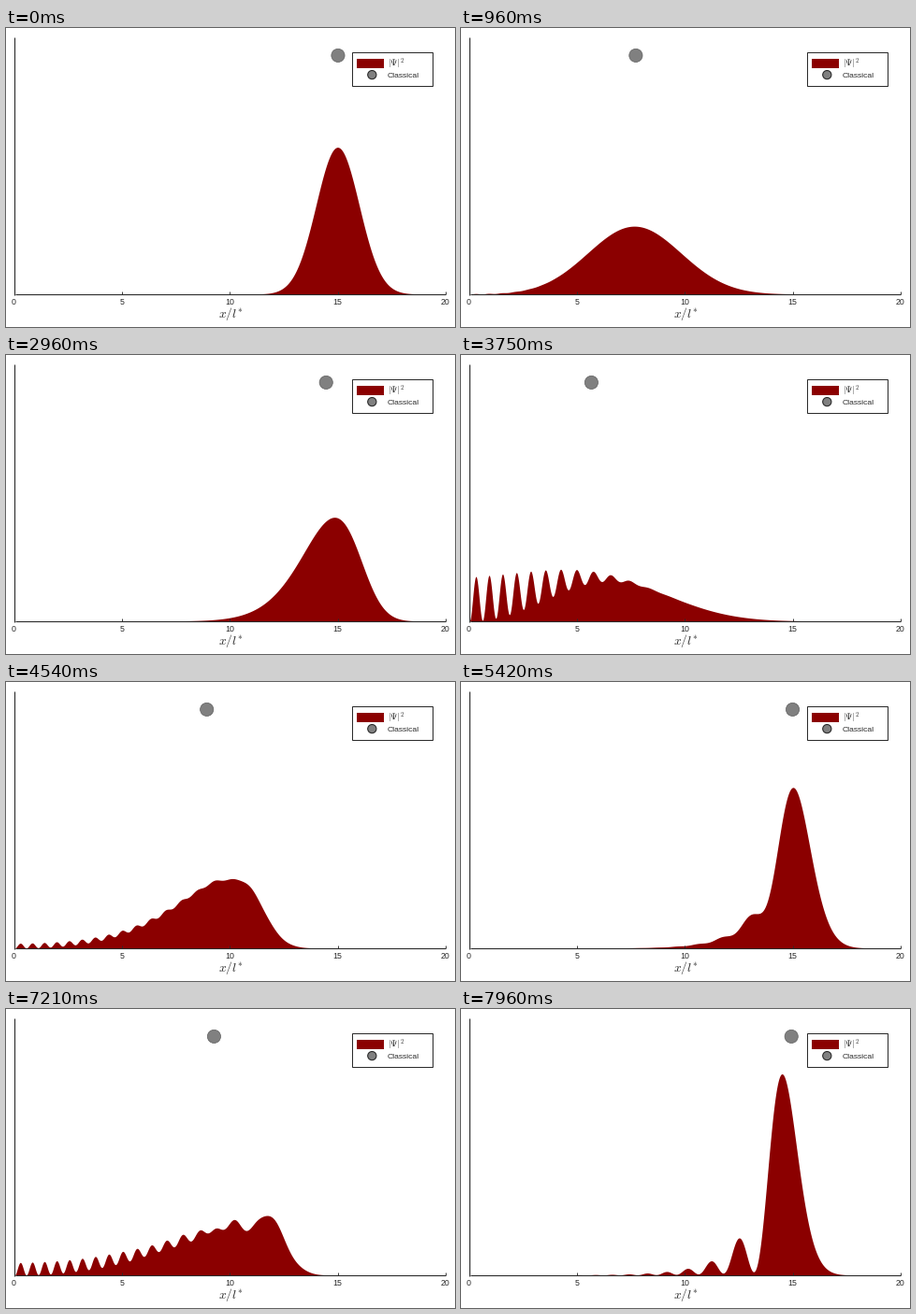
A matplotlib script that plays this animation: 480 by 320 pixels, repeating every 8000 ms.

```python
import numpy as np
import matplotlib.pyplot as plt
from matplotlib.animation import FuncAnimation
from matplotlib.patches import Circle, Polygon, Rectangle

W, H, DPI = 480, 320, 100
PX = 72 / DPI                      # points per pixel
FRAMES, LOOP = 192, 8000
X0, Y0 = 9.5, 285.3                # pixel position of the plot's corner
SX, SY = 23.03, 394.0              # pixels per unit of x and of density
START = 15.0                       # release height
DT = 0.02491 * np.sqrt(2 * START)  # time of one simulation step
WAVE_RATE = 1.0035                 # the wave runs slightly ahead of the ball
RED = "#8b0000"
GRAY = "#808080"
INK = "#2a2a2a"

plt.rcParams["font.family"] = "Liberation Sans"
plt.rcParams["mathtext.fontset"] = "cm"

# Bouncing wave packet: H = p^2/2 + x with a hard wall at x = 0,
# diagonalised in a sine basis on a box of length BOX.
BOX, N = 32.0, 340
n = np.arange(1, N)
grid = n * BOX / N
sines = np.sqrt(2 / N) * np.sin(np.pi * np.outer(n, n) / N)
kinetic = (np.pi * n / BOX) ** 2 / 2
energy, states = np.linalg.eigh((sines * kinetic) @ sines + np.diag(grid))

packet = np.exp(-(grid - START) ** 2 / 4) / (2 * np.pi) ** 0.25
amps = states.T @ packet
keep = np.abs(amps) > 1e-7
energy, amps = energy[keep], amps[keep]

xs = np.linspace(0, 20, 922)
fine = np.sqrt(2 / N) * np.sin(np.pi * np.outer(xs, n) / BOX)
modes = fine @ (sines @ states[:, keep]) * amps


def density(t):
    return np.abs(modes @ np.exp(-1j * energy * t)) ** 2


def height(t):
    fall = np.sqrt(2 * START)
    tau = (t + fall) % (2 * fall) - fall
    return START - tau ** 2 / 2


fig = plt.figure(figsize=(W / DPI, H / DPI), dpi=DPI, facecolor="white")
ax = fig.add_axes([0, 0, 1, 1])
ax.set_xlim(0, W)
ax.set_ylim(H, 0)
ax.axis("off")


def line(xa, ya, xb, yb, width=1.0):
    ax.plot([xa, xb], [ya, yb], color=INK, lw=width * PX,
            solid_capstyle="butt", zorder=3)


def label(x, y, text, size, **kw):
    ax.text(x, y, text, fontsize=size * PX, color=INK, zorder=6, **kw)


# Axes
line(9.1, 10, 9.1, 285.9, 1.1)
line(X0, 285.1, X0 + 20 * SX, 285.1, 1.1)
for v in range(0, 21, 5):
    x = X0 + v * SX
    line(x - 0.4, 285, x - 0.4, 282, 0.9)
    label(x - 1, 296.5, str(v), 8.8, ha="center")
label(240, 310, r"$x/l^{*}$", 13.6, ha="center")

# Legend
ax.add_patch(Rectangle((370, 26.1), 86, 36, fc="white", ec=INK,
                       lw=PX, zorder=4))
ax.add_patch(Rectangle((374.5, 33), 29, 10, fc=RED, ec="none", zorder=5))
ax.add_patch(Circle((391.3, 50.1), 4.6, fc=GRAY, ec=INK,
                    lw=1.1 * PX, zorder=5))
label(407.5, 41, r"$|\Psi|^2$", 9.5)
label(407.5, 53.4, "Classical", 8.5)

# Moving parts
hump = Polygon([[X0, Y0], [X0 + 1, Y0]], closed=True, fc=RED, ec="none",
               zorder=2)
ball = Circle((0, 29.4), 7.1, fc=GRAY, ec="#606060", lw=0.7 * PX, zorder=3)
ax.add_patch(hump)
ax.add_patch(ball)

base = [[X0 + 20 * SX, Y0], [X0, Y0]]


def update(i):
    # 30 simulation steps per second shown at 24 frames per second
    t = (i * 5 // 4) * DT
    wave = density(t * WAVE_RATE)
    curve = np.column_stack([X0 + xs * SX, Y0 - wave * SY])
    hump.set_xy(np.vstack([curve, base]))
    ball.center = (X0 + height(t) * SX, 29.4)
    return hump, ball


anim = FuncAnimation(fig, update, frames=FRAMES, interval=LOOP / FRAMES,
                     repeat=True, repeat_delay=0, blit=False)
plt.show()
```
